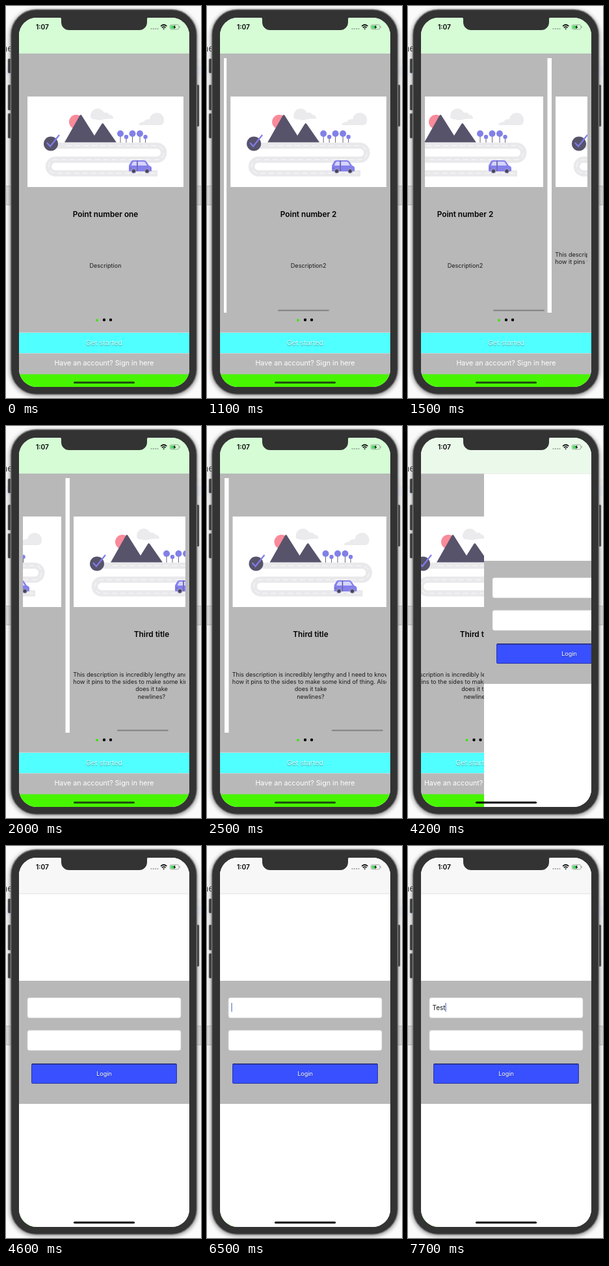
An HTML page for the animation above (8000 ms loop, 300 by 602 pixels).

```html
<!DOCTYPE html>
<html lang="en">
<head>
<meta charset="utf-8">
<title>Onboarding and login</title>
<style>
  html, body { margin: 0; width: 100%; height: 100%; overflow: hidden; background: #fafafa; }
  svg { display: block; width: 300px; height: 602px; font-family: Inter, sans-serif; }
  .mid { text-anchor: middle; }
  .title { font-size: 11.8px; font-weight: 600; }
  .desc { font-size: 9.1px; fill: #1c1c1c; }
  .button { font-size: 10.7px; fill: #fff; }
  .raised { text-shadow: 0 1px 1px rgba(0, 0, 0, .4); }
</style>
</head>
<body>
<svg viewBox="0 0 300 602">
  <defs>
    <clipPath id="screen"><rect x="20" y="18" width="262" height="567" rx="27"/></clipPath>
    <clipPath id="pager"><rect x="26" y="80" width="250" height="391"/></clipPath>
    <filter id="blur" x="-10%" y="-10%" width="120%" height="120%"><feGaussianBlur stdDeviation="3"/></filter>

    <g id="art">
      <rect width="240" height="139" fill="#fff"/>
      <g fill="#ebebed">
        <path d="M97 30a11 11 0 0 1 21-5q5-2 8 3q6 0 6 6q-14 0-18 2q-6 1-9-1q-8 1-8-5z"/>
        <path d="M171 43q2-4 8-4q3-5 9-4a11 11 0 0 1 22 2q0 6-6 7h-30q-3 0-3-1z"/>
      </g>
      <circle cx="75" cy="39" r="11" fill="#f98a9a"/>
      <path d="M57 70.500L80 30q2-4 4 0L103 60L114 42.500q1.500-3 3.500 0L137 70.500z" fill="#57536b"/>
      <g id="trees"></g>
      <path id="road" d="M37 75.500H199a10.750 10.750 0 0 1 0 21.500H43a10.500 10.500 0 0 0 0 21H200"
            fill="none" stroke="#e9e9ec" stroke-width="9.500"/>
      <path d="M60 75.500H199a10.750 10.750 0 0 1 0 21.500H43a10.500 10.500 0 0 0 0 21H200"
            fill="none" stroke="#fff" stroke-width=".8" stroke-dasharray="8 5"/>
      <circle cx="36" cy="72.500" r="11" fill="#57536b"/>
      <path d="M30 71l5 5.500L49 59" fill="none" stroke="#7f7ce8" stroke-width="2.200"/>
      <path d="M156 114v-7q0-2 1-3l3-5q1-1 3-1h16q3 0 4 2l4 6q4 1 4 4v4q0 1-2 1h-31q-2 0-2-1z" fill="#8580ec"/>
      <path d="M160 105l2-4q1-1 2-1h4v6h-8zM170 100h9q1 0 2 1l3 5h-14z" fill="#d5d4fa"/>
      <path d="M169 98v17M157 110h3" stroke="#57536b" stroke-width=".8"/>
      <g fill="#484560" stroke="#a9a7c4"><circle cx="163.500" cy="114.500" r="3.300"/><circle cx="184" cy="114.500" r="3.300"/></g>
    </g>
  </defs>

  <!-- desktop behind the device -->
  <rect width="300" height="602" fill="#fafafa"/>
  <rect y="81" width="300" height="195" fill="#f5f5f6"/>
  <rect y="92" width="300" height="15" fill="#edf1f7"/>
  <path d="M0 276.500h300v29H0z" fill="#dedede" stroke="#c2c2c2"/>
  <text x="-10" y="70" font-size="14" fill="#444">me</text>

  <!-- device -->
  <rect x="6" y="6" width="289" height="593" rx="40" fill="#000" opacity=".4" filter="url(#blur)"/>
  <g fill="#3c3c3c" stroke="#808080" stroke-width=".6">
    <rect x="3" y="81" width="6" height="22" rx="1.500"/>
    <rect x="3" y="121" width="6" height="39" rx="1.500"/>
    <rect x="3" y="165" width="6" height="38" rx="1.500"/>
    <rect x="291" y="121" width="6" height="64" rx="1.500"/>
  </g>
  <rect x="7.500" y="5.500" width="286" height="591" rx="39" fill="#333" stroke="#7d7d7d" stroke-width="1.500"/>

  <g clip-path="url(#screen)">
    <rect x="20" y="18" width="262" height="567" fill="#fff"/>

    <g id="intro">
      <rect x="20" y="73" width="262" height="493" fill="#b8b8b8"/>
      <g clip-path="url(#pager)">
        <g id="pages"></g>
        <rect id="bar" y="466.500" width="79" height="2" rx="1" fill="#828282"/>
      </g>
      <circle cx="140" cy="482.500" r="2" fill="#3fe60c"/>
      <circle cx="151" cy="482" r="2.200"/>
      <circle cx="161" cy="482" r="2.200"/>
      <rect x="20" y="502" width="262" height="31" fill="#50ffff"/>
      <path d="M20 501.500h262M20 533.500h262" stroke="#d3dede" stroke-width=".7"/>
      <text class="button mid raised" x="151" y="520.500" style="fill:#d9ffff">Get started</text>
      <text class="button mid" x="151" y="551.500">Have an account? Sign in here</text>
      <rect x="20" y="565.500" width="262" height="20" fill="#47f500"/>
    </g>

    <rect x="20" y="18" width="262" height="55" fill="#d5fcd5"/>

    <g id="login">
      <rect x="20" y="73" width="262" height="512" fill="#fff"/>
      <rect x="20" y="207" width="262" height="189" fill="#b8b8b8"/>
      <g fill="#fff" stroke="#d2d2d2" stroke-width=".7">
        <rect x="33" y="233" width="236" height="31" rx="3"/>
        <rect x="33" y="283" width="236" height="31" rx="3"/>
      </g>
      <text id="entry" x="37.500" y="251.800" font-size="10" fill="#15151c"></text>
      <rect id="caret" y="241" width="1" height="13.500" fill="#4355b5"/>
      <rect x="39" y="334" width="224" height="31" rx="2" fill="#3850ff"/>
      <rect x="39.500" y="334.500" width="223" height="30" rx="2" fill="none" stroke="#2a35a8"/>
      <path d="M40 334.700h222" stroke="#252a70" stroke-width="1.600"/>
      <text class="mid raised" x="151" y="353" font-size="9.100" fill="#fff">Login</text>
    </g>

    <g id="navbar">
      <rect x="20" y="18" width="262" height="55" fill="#f8f7f8"/>
      <path d="M20 73.300h262" stroke="#dcdcdc" stroke-width=".8"/>
    </g>

    <!-- status bar -->
    <text x="46" y="36" font-size="10.200" font-weight="600">1:07</text>
    <path d="M222.500 35h12" stroke="#8f9a8f" stroke-width="1.600" stroke-dasharray="2 1.300"/>
    <g fill="none" stroke="#000" stroke-width="1.500">
      <path d="M238 31q4.700-4.200 9.400 0M239.800 33.200q2.900-2.500 5.800 0"/>
    </g>
    <path d="M241.200 34.800q1.500-1.200 3 0l-1.500 1.500z"/>
    <rect x="252.300" y="28.800" width="13.600" height="7" rx="2" fill="none" stroke="#8c988c" stroke-width=".8"/>
    <rect x="253.400" y="29.900" width="6" height="4.800" rx="1" fill="#4cd964"/>
    <path d="M260.500 29l-3.300 3.700h2l-1 3 3.400-3.800h-2z"/>
    <path d="M267.200 31v2.600" stroke="#8c988c"/>

    <rect id="home" x="104" y="576.800" width="94" height="3" rx="1.500"/>
  </g>
  <path d="M81 17h139c-2 0-3 1-3 4v4a12 12 0 0 1-12 12h-108a12 12 0 0 1-12-12v-4c0-3-1-4-4-4z" fill="#333"/>
</svg>

<script>
const LOOP = 8000, STEP = 100, PITCH = 259, WIDTH = 262;
const $ = id => document.getElementById(id);

const scroll = [[100, 0], [500, 150], [900, 250], [1150, 258], [1500, 324],
                [1750, 396], [2000, 447], [2500, 511.5], [2700, 514.5]];
const push = [[3900, 0], [4000, 4], [4100, 70], [4200, 165], [4300, 222],
              [4400, 248], [4500, 258], [4600, WIDTH]];
const typing = [[0, ''], [6600, 'T'], [7000, 'Te'], [7300, 'Tes'], [7500, 'Test']];

const pages = [
  ['Point number one', ['Description'], 402],
  ['Point number 2', ['Description2'], 402],
  ['Third title', ['This description is incredibly lengthy and I need to know',
    'how it pins to the sides to make some kind of thing. Also', 'does it take', 'newlines?'], 385],
];

const text = (cls, y, s) => `<text class="${cls} mid" x="120" y="${y}">${s}</text>`;

$('trees').innerHTML = [[143, 57, 5], [152, 62, 3.2], [161.500, 57, 5], [173, 57, 5], [181.500, 62, 3.2]]
  .map(([x, y, r]) => `<path d="M${x} ${y}V71" stroke="#57536b" stroke-width=".9"/>
    <circle cx="${x}" cy="${y}" r="${r}" fill="#8180e8"/>`).join('');

$('pages').innerHTML = pages.map(([title, lines, y], i) => `
  <g transform="translate(${33 + i * PITCH})">
    ${i ? '<rect x="-12.500" y="80" width="6.500" height="391" fill="#fff"/>' : ''}
    <use href="#art" y="139"/>
    ${text('title', 323.7, title)}
    ${lines.map((s, n) => text('desc', y + n * 11.2, s)).join('')}
  </g>`).join('');

const clamp = v => Math.min(1, Math.max(0, v));

// Monotone cubic through [time, value] points.
function curve(pts, t) {
  const last = pts.length - 1;
  if (t <= pts[0][0]) return pts[0][1];
  if (t >= pts[last][0]) return pts[last][1];
  const slope = i => (pts[i + 1][1] - pts[i][1]) / (pts[i + 1][0] - pts[i][0]);
  const tangent = i => {
    if (i === 0 || i === last) return 0;
    const a = slope(i - 1), b = slope(i);
    return a * b > 0 ? 2 * a * b / (a + b) : 0;
  };
  const i = pts.findIndex(p => p[0] > t) - 1;
  const [t0, v0] = pts[i], [t1, v1] = pts[i + 1];
  const h = t1 - t0, u = (t - t0) / h;
  return v0 + (v1 - v0) * u * u * (3 - 2 * u)
    + h * u * (1 - u) * (tangent(i) * (1 - u) - tangent(i + 1) * u);
}

function draw(t) {
  const s = curve(scroll, t);
  $('pages').setAttribute('transform', `translate(${-s})`);
  $('bar').setAttribute('x', 26 + s * 0.324);
  $('bar').setAttribute('opacity', t < 100 ? 0 : clamp((3300 - t) / 500));

  const p = curve(push, t);
  $('intro').setAttribute('transform', `translate(${-p * 0.3})`);
  $('login').setAttribute('transform', `translate(${WIDTH - p})`);
  $('navbar').setAttribute('opacity', p / WIDTH);
  $('home').setAttribute('fill', p > WIDTH / 2 ? '#000' : '#1f4a10');

  const entry = $('entry');
  entry.textContent = typing.filter(k => k[0] <= t).pop()[1];
  const end = entry.textContent ? entry.getComputedTextLength() : 0;
  $('caret').setAttribute('x', 37.5 + end);
  $('caret').setAttribute('opacity', t < 5700 ? 0 : 1);
}

const start = performance.now();
function tick() {
  const t = (performance.now() - start) % LOOP;
  draw(Math.floor(t / STEP) * STEP);
  requestAnimationFrame(tick);
}
tick();
</script>
</body>
</html>
```
